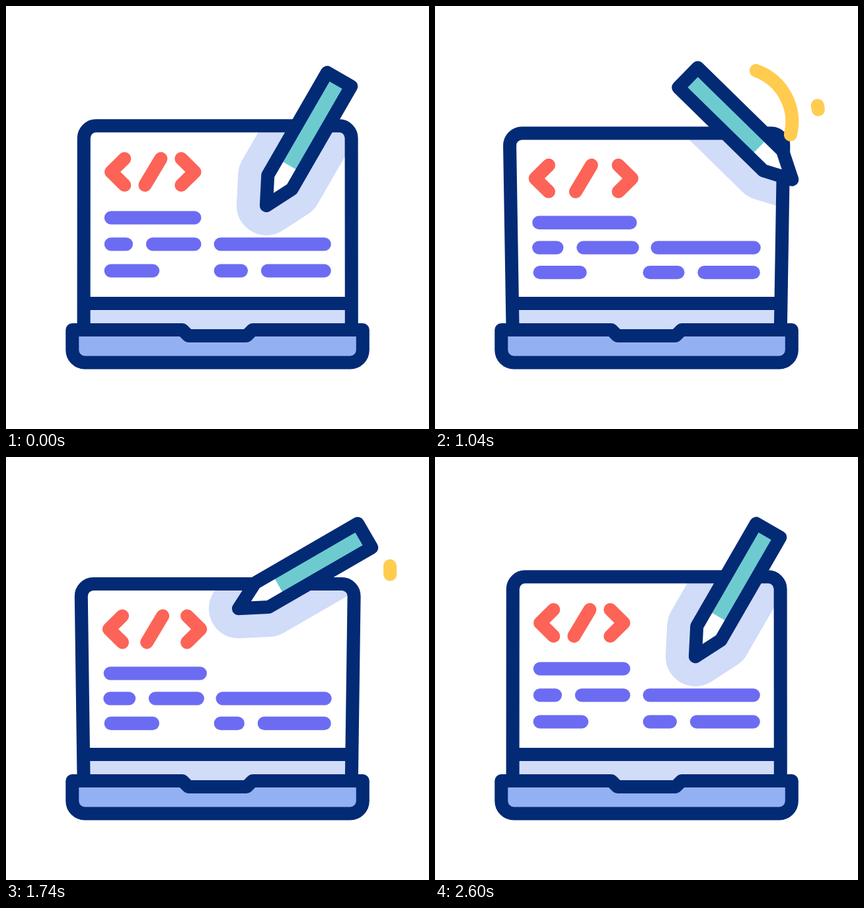
Recreate the animation shown at these times as an HTML page with a canvas. Size 640 by 640 pixels, loop 3 s.

```html
<!DOCTYPE html>
<html lang="en">
<head>
<meta charset="utf-8">
<title>Laptop and pencil</title>
<style>
html, body { margin: 0; width: 100%; height: 100%; overflow: hidden; background: #fff; }
canvas { display: block; width: 640px; height: 640px; }
</style>
</head>
<body>
<canvas id="stage"></canvas>
<script>
const LOOP = 3000;
const NAVY = '#032a75', BLUE = '#93b1f2', PALE = '#d1dcf9', VIOLET = '#6c6cf3';
const RED = '#fd6357', TEAL = '#6dcbd0', YELLOW = '#ffcc4f';

const canvas = document.getElementById('stage');
const ctx = canvas.getContext('2d');
const dpr = window.devicePixelRatio || 1;
canvas.width = canvas.height = 640 * dpr;

const rad = deg => deg * Math.PI / 180;
const mix = (a, b, k) => a + (b - a) * k;

// Eased progress between two times, 0..1
function ease(t, from, to) {
  const u = Math.min(1, Math.max(0, (t - from) / (to - from)));
  return u * u * (3 - 2 * u);
}

// Eased value along [time, value] keys
function track(t, keys) {
  let v = keys[0][1];
  for (let i = 1; i < keys.length; i++) {
    if (t > keys[i - 1][0]) v = mix(keys[i - 1][1], keys[i][1], ease(t, keys[i - 1][0], keys[i][0]));
  }
  return v;
}

// Keys shared by everything on the lid
const beats = (t, a, b, c) => track(t, [[200, 0], [800, a], [1400, b], [2000, c], [2600, 0]]);

function poly(points, close) {
  ctx.beginPath();
  points.forEach(([x, y], i) => i ? ctx.lineTo(x, y) : ctx.moveTo(x, y));
  if (close) ctx.closePath();
}

function stroke(color, width = 20) {
  ctx.strokeStyle = color;
  ctx.lineWidth = width;
  ctx.stroke();
}

function line(color, ...points) {
  poly(points);
  stroke(color);
}

function fill(color) {
  ctx.fillStyle = color;
  ctx.fill();
}

function bar(x1, x2, y) {
  poly([[x1 + 10.2, y], [x2 - 10.2, y]]);
  stroke(VIOLET, 20.4);
}

function lidPath(spread, top) {
  const left = 117.8 - spread, right = 522.6 + spread;
  ctx.beginPath();
  ctx.moveTo(117.6, 490);
  ctx.arcTo(left, top, 320, top, 18.5);
  ctx.arcTo(right, top, 522.8, 490, 18.5);
  ctx.lineTo(522.8, 490);
}

function pencilPath() {
  poly([[-5, 120], [-26, 79], [-26, -100.5], [16, -100.5], [16, 79]], true);
}

function inPencil(pose, draw) {
  ctx.save();
  ctx.translate(458.2, pose.y);
  ctx.rotate(rad(pose.angle));
  draw();
  ctx.restore();
}

function drawPencil() {
  pencilPath();
  fill('#fff');
  ctx.fillStyle = TEAL;
  ctx.fillRect(-20, -100, 30, 150);
  pencilPath();
  stroke(NAVY);
}

// Trimmed arc running ahead of the tip
function swoosh(radius, lead, sweep, tail, head) {
  if (head <= tail) return;
  const at = k => rad(90 - lead - sweep * k);
  ctx.beginPath();
  ctx.arc(0, 0, radius, at(tail), at(head), true);
  stroke(YELLOW);
}

function drawSparks(t, dx, dy) {
  const head = ease(t, 1050, 1400), tail = ease(t, 1300, 1700);
  if (head <= tail) return;
  const rays = [[136.3, 155.8, 128, 125], [106.5, 171.7, 84, 148], [91.8, 200.1, 61, 193]];
  for (const [x1, y1, x2, y2] of rays) {
    const at = k => [mix(x1, x2, k) + dx, mix(y1, y2, k) + dy];
    line(YELLOW, at(tail), at(head));
  }
}

function drawCode(spread, slide, push, drop) {
  const y = 251 + drop;
  const open = -spread - push / 5, shut = spread + push / 5 + 2 * slide;
  line(RED, [179.3 + open, y - 20], [159 + open, y], [179.3 + open, y + 20]);
  line(RED, [234.3 + slide, y - 20], [210.3 + slide, y + 20]);
  line(RED, [265.2 + shut, y - 20], [285.5 + shut, y], [265.2 + shut, y + 20]);
}

function drawBars(spread, slide, push, drop) {
  const y1 = 320.4 + drop * 0.74, y2 = 360.4 + drop * 0.53, y3 = 400.6 + drop * 0.26;
  bar(148.8 - spread * 0.5 + slide * 0.37, 295.4 + spread * 2, y1);

  const a2 = 192 - spread + slide * 3;
  const b2 = 295.4 + spread + push / 2 + slide;
  bar(148.8 - spread * 0.35, a2, y2);
  bar(a2 + 19.8, b2, y2);
  bar(b2 + 19.2 - slide * 0.55, 491.8 + spread * 0.2, y2);

  const a3 = 232.2 - spread * 2 + slide * 3;
  const b3 = 366 + push;
  bar(148.6, a3, y3);
  bar(314.6, b3, y3);
  bar(b3 + 19.8, 491.8, y3);
}

function drawBase() {
  ctx.beginPath();
  ctx.moveTo(100.3, 490);
  [[267, 490], [276, 499], [364, 499], [373, 490], [539.8, 490]].forEach(p => ctx.lineTo(...p));
  ctx.arcTo(539.8, 539.5, 500, 539.5, 19);
  ctx.arcTo(100.3, 539.5, 100.3, 500, 19);
  ctx.closePath();
  fill(BLUE);
  stroke(NAVY);
}

function draw(t) {
  const spread = beats(t, 12.6, -8.8, 12.9);
  const slide = beats(t, 0, 7, 0);
  const push = beats(t, 25, -13, 0);
  const drop = beats(t, 9.7, 10.1, 9);
  const sink = beats(t, 10.2, 13, 9.2);
  const top = 181.3 + sink;
  const pose = {
    angle: track(t, [[200, 30], [500, 66], [2100, -354], [2600, -330]]),
    y: track(t, [[200, 200.6], [500, 215], [1260, 165], [1590, 165], [2260, 231], [2600, 200.6]])
  };

  ctx.setTransform(dpr, 0, 0, dpr, 0, 0);
  ctx.fillStyle = '#fff';
  ctx.fillRect(0, 0, 640, 640);
  ctx.lineCap = ctx.lineJoin = 'round';

  ctx.save();
  lidPath(spread, top);
  ctx.clip();
  inPencil(pose, () => {
    pencilPath();
    fill(PALE);
    stroke(PALE, 90);
  });
  ctx.fillStyle = PALE;
  ctx.fillRect(100, 450, 440, 40);
  ctx.restore();

  drawCode(spread, slide, push, drop);
  drawBars(spread, slide, push, drop);

  line(NAVY, [118, 450], [522, 450]);
  lidPath(spread, top);
  stroke(NAVY);
  drawBase();

  inPencil(pose, () => {
    drawPencil();
    swoosh(82, 30.5, 89.5, ease(t, 1100, 1500), ease(t, 700, 1100));
    swoosh(123, 53, 101, ease(t, 1400, 1800), ease(t, 1000, 1400));
  });
  drawSparks(t, -8.8 - spread, sink - 13);
}

const start = performance.now();
function tick() {
  draw((performance.now() - start) % LOOP);
  requestAnimationFrame(tick);
}
tick();
</script>
</body>
</html>
```
